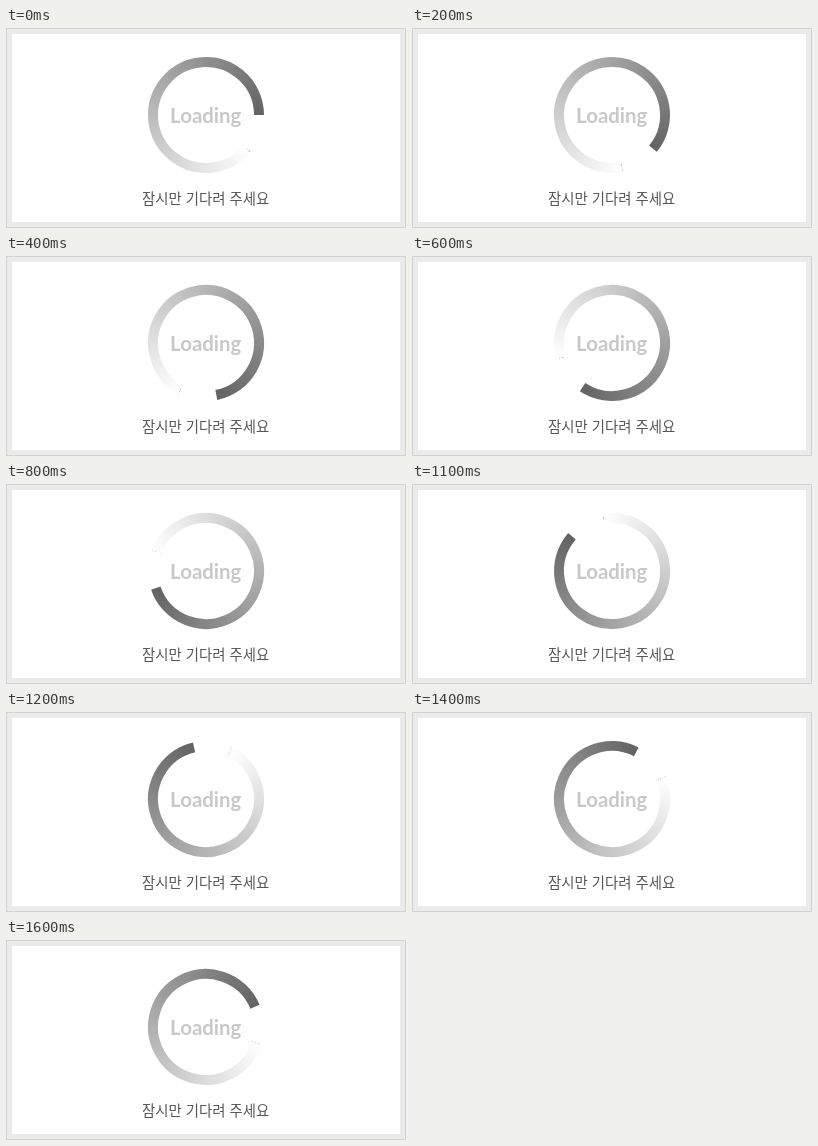
An HTML page with a canvas for the animation above (1.7 s loop, 400 px wide and 200 px high).

```html
<!DOCTYPE html>
<html lang="ko">
<head>
<meta charset="utf-8">
<title>Loading</title>
<style>
  html, body { margin: 0; width: 100%; height: 100%; overflow: hidden; background: #fff; }
  canvas, svg { position: absolute; left: 0; top: 0; }
  text { text-anchor: middle; }
  .loading { font: bold 20.4px Lato, sans-serif; fill: #c8c8c8; }
  .wait { font: 500 14.4px "Noto Sans CJK KR", "Noto Sans CJK", sans-serif; fill: #555; }
</style>
</head>
<body>
<canvas width="400" height="200"></canvas>
<svg width="400" height="200">
  <rect x="3" y="3" width="394" height="194" fill="none" stroke="#ebebeb" stroke-width="6"/>
  <rect x=".5" y=".5" width="399" height="199" fill="none" stroke="#d2d2d2"/>
  <text class="loading" x="199.7" y="95">Loading</text>
  <text class="wait" x="199.7" y="176">잠시만 기다려 주세요</text>
</svg>
<script>
const ctx = document.querySelector('canvas').getContext('2d');
const CX = 200, CY = 87, RADIUS = 53, WIDTH = 10;
const STEP = 100, STEPS = 17, SPAN = 320;

// [step, head angle in degrees clockwise from the top]
const KEYS = [[0, 90], [4, 168.75], [6, 213.75], [9, 270], [11, 311], [12, 347], [16, 427.5], [17, 450]];

const radians = degrees => (degrees - 90) * Math.PI / 180;

function headAngle(step) {
  const i = KEYS.findIndex(key => key[0] > step);
  const [s0, a0] = KEYS[i - 1], [s1, a1] = KEYS[i];
  return a0 + (a1 - a0) * (step - s0) / (s1 - s0);
}

function draw(time) {
  const head = headAngle(Math.floor(time / STEP) % STEPS);
  const tail = head - SPAN;
  const shade = ctx.createConicGradient(radians(tail), CX, CY);
  shade.addColorStop(0, '#fff');
  shade.addColorStop(SPAN / 360, '#636363');
  shade.addColorStop(1, '#636363');

  ctx.clearRect(0, 0, 400, 200);
  ctx.strokeStyle = shade;
  ctx.lineWidth = WIDTH;
  ctx.beginPath();
  ctx.arc(CX, CY, RADIUS, radians(tail), radians(head));
  ctx.stroke();
}

const start = performance.now();
function tick() {
  draw(performance.now() - start);
  requestAnimationFrame(tick);
}
tick();
</script>
</body>
</html>
```
